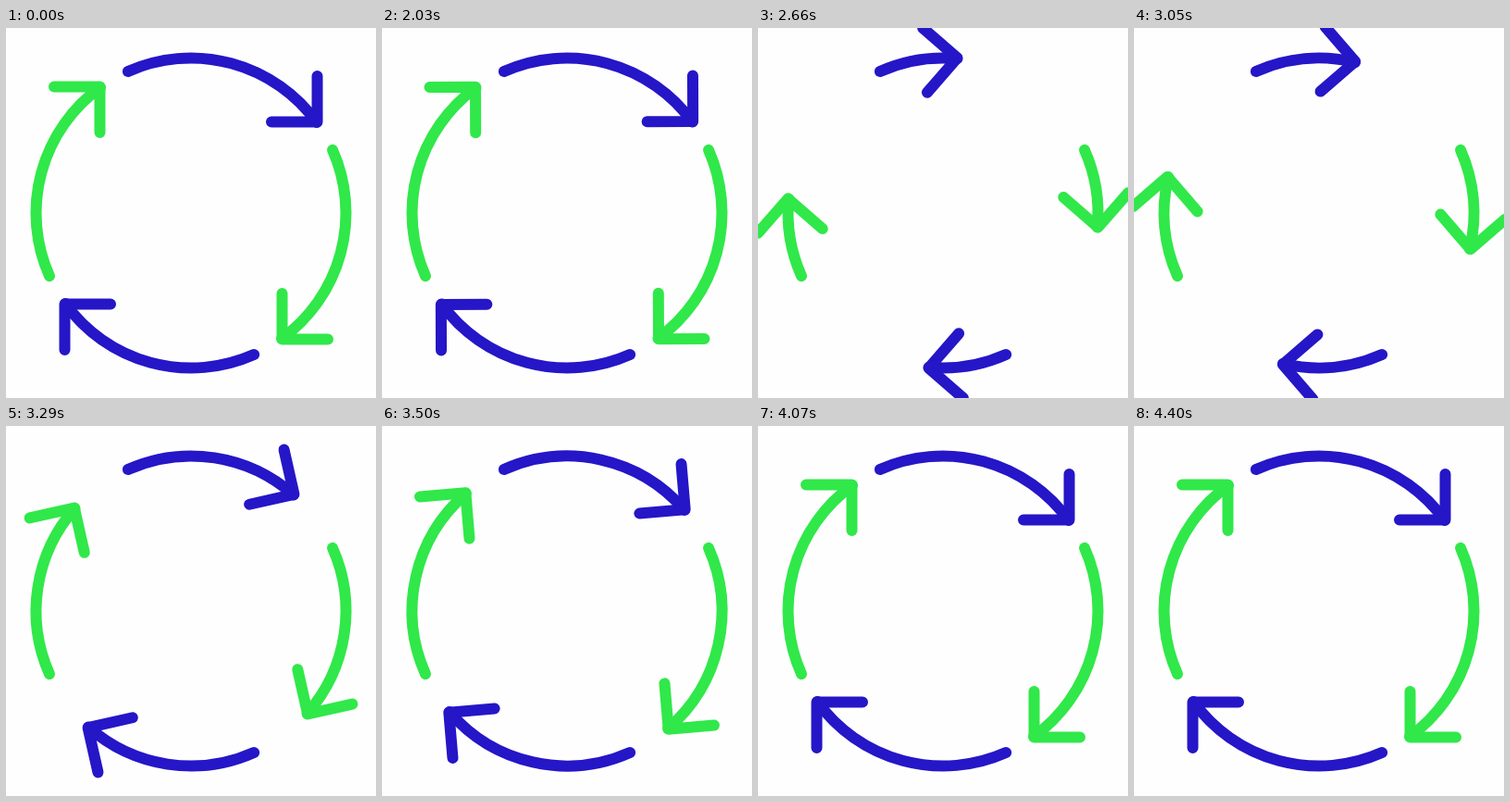
An HTML page with a canvas for the animation above (4430 ms loop, 400 by 400 pixels).

```html
<!DOCTYPE html>
<html>
<head>
<meta charset="utf-8">
<title>Circling arrows</title>
<style>
  html, body { margin: 0; width: 100%; height: 100%; overflow: hidden; background: #fefefe; }
  canvas { display: block; }
</style>
</head>
<body>
<canvas id="stage" width="400" height="400"></canvas>
<script>
const ctx = document.getElementById('stage').getContext('2d');
const BLUE = '#2516c7', GREEN = '#30e849';
const LOOP = 4430, HOLD = 2000, STEP = 30;
const SHRINK = 860, GROW = 1150;   // ms
const SWING = 50;                  // degrees the heads travel back
const RADIUS = 167.5, TAIL = -114, TIP = -35.8;
const rad = deg => deg * Math.PI / 180;

// cubic-bezier(1/3, 0, 0, 1)
function ease(x) {
  if (x <= 0) return 0;
  if (x >= 1) return 1;
  let lo = 0, hi = 1;
  for (let i = 0; i < 30; i++) {
    const s = (lo + hi) / 2;
    if (s * (1 - s) ** 2 + s ** 3 < x) lo = s; else hi = s;
  }
  return lo * lo * (3 - 2 * lo);
}

function headAngle(ms) {
  const t = Math.floor((ms - HOLD) / STEP) * STEP;
  return -SWING * (ease(t / SHRINK) - ease((t - SHRINK) / GROW));
}

function drawArrow(turn, color, angle) {
  ctx.save();
  ctx.translate(200, 200);
  ctx.rotate(rad(turn));
  ctx.strokeStyle = color;
  ctx.beginPath();
  ctx.arc(0, 0, RADIUS, rad(TAIL), rad(TIP + angle));
  ctx.stroke();
  ctx.rotate(rad(angle));
  ctx.beginPath();
  ctx.moveTo(87, -98.5);
  ctx.lineTo(136.5, -98.5);
  ctx.lineTo(136.5, -148);
  ctx.stroke();
  ctx.restore();
}

function draw(now) {
  const angle = headAngle(now % LOOP);
  ctx.fillStyle = '#fefefe';
  ctx.fillRect(0, 0, 400, 400);
  ctx.lineWidth = 12;
  ctx.lineCap = ctx.lineJoin = 'round';
  for (let i = 0; i < 4; i++) drawArrow(i * 90, i % 2 ? GREEN : BLUE, angle);
}

let start;
function tick(now) {
  start ??= now;
  draw(now - start);
  requestAnimationFrame(tick);
}
requestAnimationFrame(tick);
</script>
</body>
</html>
```
